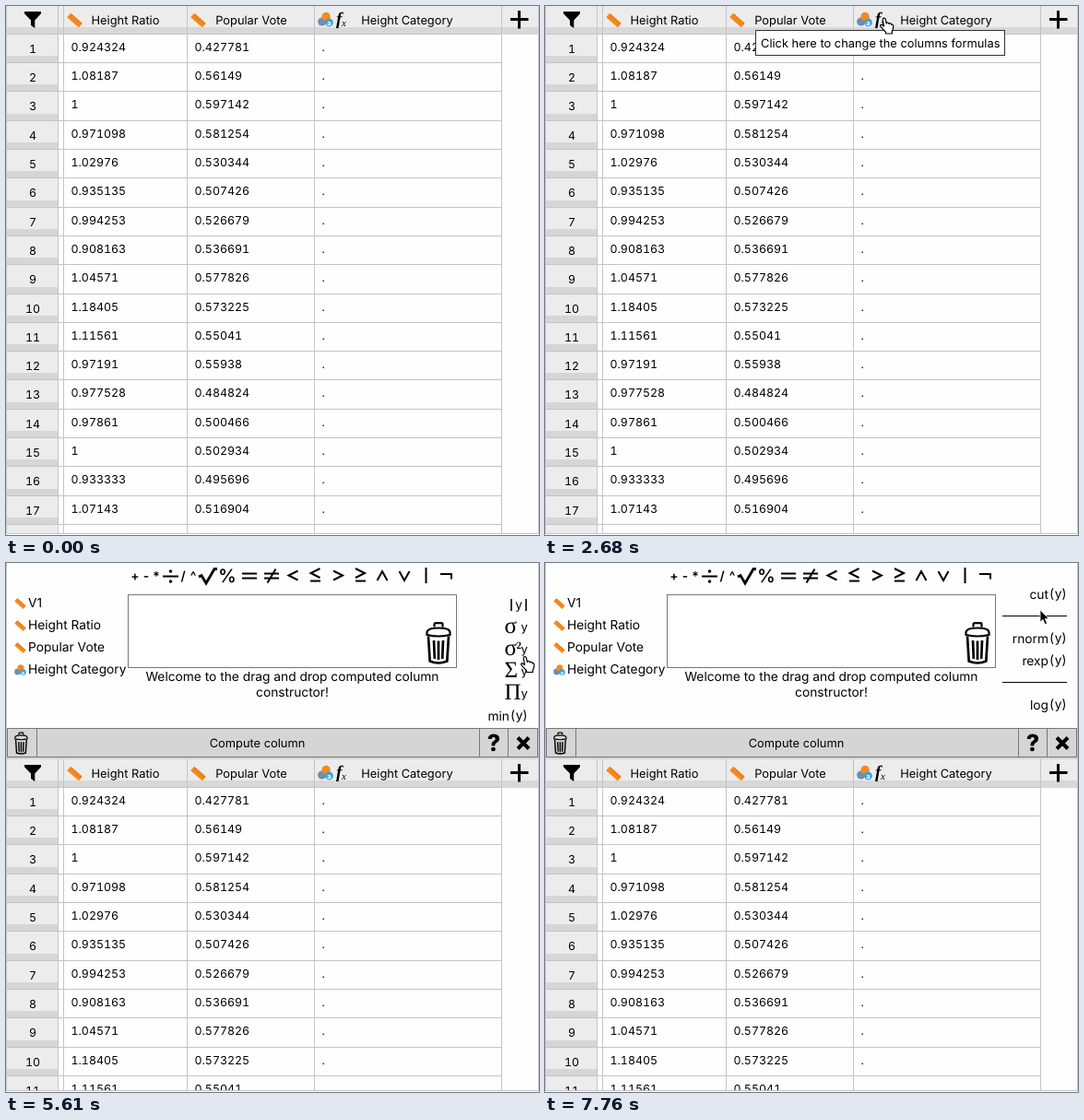
Write an HTML page that moves like this. It is 578 px wide and 574 px high and loops after 8000 ms.

```html
<!DOCTYPE html>
<html lang="en">
<head>
<meta charset="utf-8">
<style>
html, body { margin: 0; width: 100%; height: 100%; overflow: hidden; background: #fff; }
svg { display: block; font: 12.85px Inter, "Open Sans", sans-serif; text-rendering: geometricPrecision; }
.cells { font-size: 12.4px; font-variant-numeric: tabular-nums; }
.panel { font-size: 13.75px; }
.serif { font-family: "Liberation Serif", "Noto Serif", serif; }
.mid { text-anchor: middle; }
.end { text-anchor: end; }
.line { fill: none; stroke: #000; stroke-width: 2; }
</style>
</head>
<body>
<svg id="stage" width="578" height="574" viewBox="0 0 578 574">
  <defs>
    <clipPath id="view"><path d="M0 0H578V572H0z"/></clipPath>
    <g id="ruler" transform="rotate(42)">
      <rect x="-8.5" y="-3" width="17" height="6" rx=".5" fill="#f7891e"/>
      <path d="M-5.5-3v2.5M-2.5-3v2.5M.5-3v2.5M3.5-3v2.5M6.5-3v2.5" stroke="#c96a10" stroke-width=".9"/>
    </g>
    <g id="nominal">
      <circle cx="-3.8" cy="2.5" r="4.6" fill="#6c8fae"/>
      <circle cx=".6" cy="-3" r="4.7" fill="#f7891e"/>
      <circle cx="4" cy="3.4" r="4.3" fill="#35a4dc"/>
      <text x="4" y="6" class="mid" font-size="7.5" font-weight="700" fill="#fff">a</text>
    </g>
    <g id="trash" fill="none" stroke="#000" stroke-width="2.2">
      <path d="M9.5 5.5V2.5q0-1.3 1.5-1.3h6q1.5 0 1.5 1.3v3"/>
      <path d="M1.5 11.5q0-5 12.5-5t12.5 5v2.5q-12.5 3-25 0z"/>
      <path d="M3 15.5l1.7 27q9.3 4 18.6 0l1.7-27M9 20l.8 20M14 20.5v20.5M19 20l-.8 20" stroke-width="2.7"/>
    </g>
    <path id="arrow" d="M0 0V13.2L3 10.4 5.2 15.6 7.6 14.6 5.4 9.6H9.4z" stroke="#fff" stroke-width=".8"/>
    <path id="point" fill="#fff" stroke="#000" stroke-width="1.2" stroke-linejoin="round"
      d="M3.2 2.4q-.1-1.8 1.4-1.8t1.8 1.7l.9 4.2q.3-1.2 1.5-1t1.1 1.4q.6-1 1.7-.6t.9 1.5q1-.7 1.7.1t.5 2.4q0 2.8-1.4 4.6v2.6h-6.8v-1.8Q4 13.4 1 9.9q-.9-1.5.3-2t3.2 1.6z"/>
    <path id="open" fill="#fff" stroke="#000" stroke-width="1.2" stroke-linejoin="round"
      d="M4 9.5L2.6 4.8q-.2-1.5 1-1.7t1.7 1.2l1 3.2-.3-5.4q0-1.5 1.2-1.5t1.4 1.4l.3 5 .6-4.8q.3-1.2 1.4-1.1t1.2 1.5l-.3 5.2 1.1-3.4q.6-1 1.5-.6t.6 1.7l-.9 4.6q-.2 2.6-1.6 4.2v2.6H6v-1.8L1.8 10.6q-.9-1.5.1-2.1t2.1 1z"/>
  </defs>
  <g clip-path="url(#view)"><g id="table"></g></g>
  <g id="panel" class="panel"></g>
  <path d="M.5 0V572.5H577.5V0" fill="none" stroke="#c4c4c4"/>
  <rect id="bar" x="569" y="1" width="6" height="222" rx="3" fill="#c1c1c1"/>
  <g id="tip">
    <rect x="228.5" y="26.5" width="270" height="27" fill="#fff" stroke="#333"/>
    <text x="234" y="44.5">Click here to change the columns formulas</text>
  </g>
  <use id="cursor"/>
</svg>
<script>
const el = id => document.getElementById(id);
const text = (x, y, s, more = '') => `<text x="${x}" y="${y}" ${more}>${s}</text>`;
const rect = (x, y, w, h, fill, more = '') =>
  `<rect x="${x}" y="${y}" width="${w}" height="${h}" fill="${fill}" ${more}/>`;
const icon = (id, x, y, k = 1) => `<use href="#${id}" transform="translate(${x} ${y}) scale(${k})"/>`;
const line = (d, w = 2) => `<path class="line" d="${d}" style="stroke-width:${w}"/>`;
const MID = 'class="mid"', END = 'class="end"', GRID = '#c4c4c4';

const ratio = `0.924324 1.08187 1 0.971098 1.02976 0.935135 0.994253 0.908163 1.04571 1.18405
  1.11561 0.97191 0.977528 0.97861 1 0.933333 1.07143 0.966292`.split(/\s+/);
const vote = `0.427781 0.56149 0.597142 0.581254 0.530344 0.507426 0.526679 0.536691 0.577826 0.573225
  0.55041 0.55938 0.484824 0.500466 0.502934 0.495696 0.516904 0.520054`.split(/\s+/);

function tableMarkup() {
  const rowTop = i => Math.floor(30.3 + 31.3 * i);
  let out = rect(0, 0, 578, 572, '#fefefe') + rect(0, 0, 578, 30, '#ececec') + rect(0, 23, 578, 7, '#d8d8d8');
  out += '<g class="cells">';
  ratio.forEach((r, i) => {
    const y0 = rowTop(i), y1 = rowTop(i + 1), base = y0 + 19;
    out += rect(1, y0, 56, y1 - y0, '#ececec') + rect(1, y1 - 7, 56, 7, '#d6d6d6')
      + rect(0, y0, 538, 1, GRID)
      + text(29, base + 2, i + 1, MID) + text(70.5, base, r) + text(204.5, base, vote[i]) + text(342.5, base, '.');
  });
  out += '</g>';
  for (const x of [56, 62, 196, 334, 537]) out += rect(x, 0, 1, 572, GRID);
  return out + rect(538, 30, 40, 1, '#d8d8d8')
    + '<path d="M20 6H38V8.3L31.3 15.5V24L27 21V15.5L20 8.3z"/>'
    + icon('ruler', 74.5, 15.5) + icon('ruler', 208.5, 15.5) + icon('nominal', 346.5, 14.5)
    + text(358, 20, 'f', 'class="serif" font-size="19" font-style="italic" font-weight="700"')
    + text(364, 21.5, 'x', 'class="serif" font-size="11" font-style="italic"')
    + text(129.5, 20, 'Height Ratio', MID) + text(266, 20, 'Popular Vote', MID)
    + text(435, 20, 'Height Category', MID) + line('M547 14.5H566.5M556.5 5V24.5', 3);
}

function panelMarkup() {
  let out = rect(1, 0, 576, 180, '#fefefe');
  [['+', 140], ['-', 152], ['*', 163], ['/', 192], ['^', 203]].forEach(([c, x]) =>
    out += text(x, 19, c, MID + ' font-weight="600"'));
  out += text(240, 21, '%', MID + ' font-size="20" font-weight="500"')
    + line('M170 14.5H187') + '<circle cx="178.5" cy="9" r="1.8"/><circle cx="178.5" cy="20" r="1.8"/>'
    + line('M209 15L212 13.5 217 22 226 6.5H229', 2.8)
    + line('M256 11.5H272M256 16.5H272M280 11.5H296M280 16.5H296M292.5 6.5L283.5 21.5')
    + line('M316.5 8.5L306.5 13.5 316.5 18.5M340.5 6L330.5 11 340.5 16M330 19.5H341')
    + line('M355 8.5L365 13.5 355 18.5M379 6L389 11 379 16M379 19.5H390')
    + line('M402.5 19L408 9 413.5 19M426.5 9L432 19 437.5 9M455.5 5V22M471 12H483V17.5');
  ['V1', 'Height Ratio', 'Popular Vote', 'Height Category'].forEach((name, i) =>
    out += icon(i < 3 ? 'ruler' : 'nominal', 15.5, 44 + 24 * i, .75) + text(24, 48 + 24 * i, name));
  out += rect(132.5, 34.5, 356, 79, '#fff', 'stroke="#777"') + icon('trash', 455, 64)
    + text(310.5, 128, 'Welcome to the drag and drop computed column', MID)
    + text(310.5, 145, 'constructor!', MID)
    + '<g id="list"></g>' + rect(1, 179, 576, 34, '#d5d5d5');
  [[1.5, 32], [33.5, 480], [513.5, 31], [544.5, 32]].forEach(([x, w]) =>
    out += rect(x, 179.5, w, 31, '#d5d5d5', 'stroke="#777"'));
  return out + icon('trash', 9, 183.5, .53)
    + text(272.5, 199.5, 'Compute column', MID + ' font-size="12.85"')
    + text(529, 204, '?', MID + ' font-size="25" font-weight="800"')
    + line('M555 189.5L567 201.5M567 189.5L555 201.5', 4);
}

const functions = ['|', 'σ', 'σ²', 'Σ', 'Π', 'min', 'max', 'mean', 'sign', 'round', 'length',
  'median', '-', 'cut', '-', 'rnorm', 'rexp', '-', 'log'];

function listMarkup(scroll) {
  return functions.map((name, i) => {
    const y = 46 + 24 * i - scroll;
    if (y < 26 || y > 169) return '';
    if (name === '-') return rect(496, y - 1, 70, 1, '#000');
    if (name === '|') return line(`M548 ${y - 7}V${y + 6}M564 ${y - 7}V${y + 6}`, 1.6) + text(556, y + 3.5, 'y', MID);
    if (i < 5) {
      return text(540.5, y + 6, name[0], 'class="serif" font-size="25"')
        + (name[1] ? text(553.5, y - 1, '2', 'class="serif" font-size="11" font-weight="700"') : '')
        + text(558.5, y + 4, 'y', 'font-size="13"');
    }
    return text(546, y + 4.5, name, END) + text(547, y + 4, '(') + text(556.5, y + 4, 'y', MID) + text(565.5, y + 4, ')', END);
  }).join('');
}

// time, cursor shape, left, top
const moves = [
  [0, ''], [1340, 'open', 476, 76], [1610, 'open', 392, 62], [1880, 'point', 366, 23], [2150, 'point', 365, 19],
  [2420, 'point', 363, 12.5], [2950, 'arrow', 367, 11], [3210, 'arrow', 372, 40], [3480, 'arrow', 325, 53],
  [3740, 'arrow', 264, 68], [4010, 'arrow', 150, 73], [4270, 'point', 62, 69], [4540, 'point', 47, 63],
  [4810, 'arrow', 338, 96], [5080, 'arrow', 460, 89], [5340, 'point', 563, 95], [5610, 'point', 558, 101],
  [5880, 'point', 558, 102], [6960, 'arrow', 556, 84], [7230, 'arrow', 548, 70], [7500, 'arrow', 540, 58],
  [7760, 'arrow', 537, 51]];
// time, list offset
const scrolls = [[0, 0], [5880, 94], [6150, 132], [6420, 210], [6690, 278], [6960, 302], [7230, 330], [7500, 327], [7760, 324]];
const at = (steps, t) => steps.findLast(s => s[0] <= t);
const show = (id, on) => el(id).style.display = on ? '' : 'none';

el('table').innerHTML = tableMarkup();
el('panel').innerHTML = panelMarkup();
let shown;

function draw(now) {
  const t = now % 8000, open = t >= 2950;
  const [, shape, x, y] = at(moves, t), scroll = at(scrolls, t)[1];
  show('panel', open);
  show('bar', t >= 1340 && t < 1880);
  show('tip', t >= 2680 && !open);
  show('cursor', shape);
  el('table').setAttribute('transform', `translate(0 ${open ? 213 : 0})`);
  if (shape) {
    el('cursor').setAttribute('href', '#' + shape);
    el('cursor').setAttribute('transform', `translate(${x} ${y})`);
  }
  if (scroll !== shown) el('list').innerHTML = listMarkup(shown = scroll);
  requestAnimationFrame(draw);
}
draw(performance.now());
</script>
</body>
</html>
```
